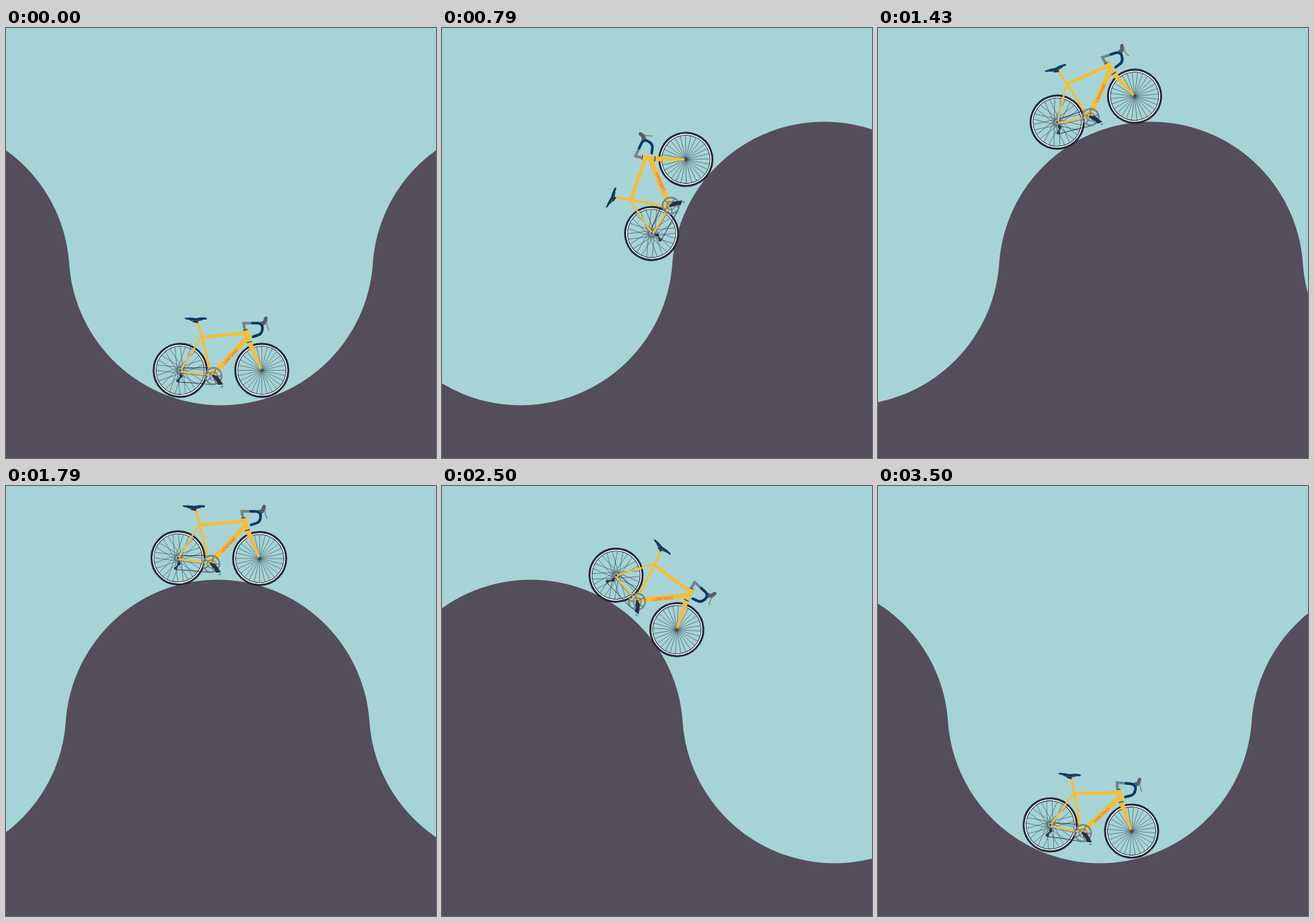
An HTML page that plays this animation: 640x640 px, repeating every 3.57 s.

```html
<!DOCTYPE html>
<html lang="en">
<head>
<meta charset="utf-8">
<title>Bike over the hills</title>
<style>
html, body { margin: 0; height: 100%; overflow: hidden; background: #a6d4d6; }
svg { display: block; width: 100vw; height: 100vh; }
#bike path, #bike circle { fill: none; }
#bike .fill { stroke: none; }
.frame { stroke: #f5bd38; }
.navy { stroke: #083a66; stroke-linejoin: round; stroke-linecap: round; }
.grey { stroke: #738488; }
.dark { stroke: #2c2f49; }
.tyre { stroke: #252736; }
.spokes { stroke: #3b4a55; stroke-width: .6; }
</style>
</head>
<body>
<svg viewBox="0 0 640 640">
  <path id="ground" fill="#544e5c"/>
  <g id="bike"><g transform="translate(-320.25 -509.5)">
    <g id="rear" transform="translate(259.5 509.5)"></g>
    <g id="front" transform="translate(381 509.5)"></g>

    <!-- chain and derailleur -->
    <path class="dark" stroke-width=".9" d="M261 506L309 505.5M256 527L284 528.5L308 531"/>
    <path class="dark" stroke-width="2" d="M260 513L261 518L256 525"/>
    <circle class="dark" cx="261" cy="518" r="1.6" stroke-width="1.8"/>
    <circle class="dark" cx="256" cy="525" r="1.5" stroke-width="1.8"/>
    <circle class="grey" cx="259.5" cy="509.5" r="3.6" stroke-width="2.2"/>

    <!-- frame -->
    <path class="frame" stroke-width="2.6" d="M290.5 460L260 510M260 511L306 517"/>
    <path class="frame" stroke-width="3.6" d="M285 437L292 461L306 516"/>
    <path class="frame" stroke-width="5" d="M290 460.5L359 454"/>
    <path class="frame" stroke-width="7.4" d="M361 459L308 516"/>
    <path class="frame" stroke-width="7" d="M357.3 449L362 466"/>
    <path class="fill" style="fill:#f5bd38" d="M359 469L366 466.5L382.5 509.5L379.5 510.5Z"/>
    <path class="dark" stroke-width="1.3" d="M358.5 468.5L366 466.3M353.5 450L359.5 448.5"/>
    <circle class="dark" cx="381" cy="509.5" r="1.5" stroke-width="1.5"/>
    <circle class="dark" cx="259.5" cy="509.5" r="1" stroke-width="1.2"/>
    <text transform="translate(334.6 488.7) rotate(-47)" text-anchor="middle" dominant-baseline="central"
      font-family="Inter, sans-serif" font-size="6" font-weight="600" fill="#ee6a34">LONTANO</text>

    <!-- saddle -->
    <path class="dark" stroke-width="1.2" d="M273 434L281 437.5L293 434"/>
    <path class="dark" stroke-width="3" d="M279 436.5L286 438"/>
    <path class="fill" style="fill:#083a66" d="M265.5 431.5Q275 430.5 283 432Q291 430 298 431Q301 433 297.5 434Q289 433.5 284 436Q275 434.5 267.5 433.5Z"/>

    <!-- stem, bars and brake -->
    <path class="grey" stroke-width="4" d="M355.5 449L353.8 439.3H366"/>
    <path class="navy" stroke-width="4" d="M367 439.3H375Q382 440 382 446Q382 456 374 457.5L368 459.5"/>
    <path class="fill" style="fill:#555c6b" d="M378 438L383 436L384.5 431Q387 428 389.5 430.5L389 438L384 443Z"/>
    <path class="grey" stroke-width="1.5" d="M388 436Q388 444 392 450"/>

    <!-- crankset -->
    <circle class="grey" cx="309" cy="518" r="12.2" stroke-width="2.4"/>
    <circle class="grey" cx="309" cy="518" r="6" stroke-width="1.6"/>
    <path id="arms" class="grey" stroke-width="2" transform="translate(309 518)"/>
    <path class="dark" stroke-width="3.6" stroke-linecap="round" d="M308.5 517.5L318 528"/>
    <path class="fill" style="fill:#2c2f49" d="M309 516L316 519L323.5 530.5L316 531Z"/>
    <path stroke="#16806f" stroke-width="1.4" d="M320 533.8L323.5 533.5"/>
  </g></g>
</svg>
<script>
const $ = id => document.getElementById(id);
const { sin, cos, sqrt, hypot, floor, PI } = Math;

// Landscape: alternating arcs that meet at mid height
const PERIOD = 904, HALF = PERIOD / 2, RISE = 15.5, MID = 350.5;
const VALLEY_Y = MID - RISE, HILL_Y = MID + RISE;
const R = hypot(HALF / 2, RISE);
const arc = i => `a${R} ${R} 0 0 ${1 - i % 2} ${HALF} 0`;
$('ground').setAttribute('d', `M-358 ${MID}` + [0, 1, 2, 3, 4].map(arc).join('') + 'V640H-358Z');

// Wheels
const polar = (r, a) => `${(r * cos(a)).toFixed(2)} ${(r * sin(a)).toFixed(2)}`;
function rays(n, r0, r1, twist = 0) {
  let d = '';
  for (let i = 0; i < n; i++) {
    const a = i * 2 * PI / n;
    d += `M${polar(r0, a + (i % 2 ? twist : -twist))}L${polar(r1, a)}`;
  }
  return d;
}
const wheel = spokes => `
  <path class="spokes" d="${spokes}"/>
  <circle class="tyre" r="36" stroke-width="1.1"/>
  <circle r="37.3" stroke="#fff" stroke-width="1.6"/>
  <circle class="tyre" r="39.5" stroke-width="2.9"/>`;
$('rear').innerHTML = wheel(rays(28, 4.5, 36, 1.35));
$('front').innerHTML = wheel(rays(28, 1.5, 36));
$('arms').setAttribute('d', rays(5, 3, 12));

// Bike track: valley arc, straight climb, hill arc, then mirrored
const RV = 174.5, RH = 258.5;
const gap = hypot(HALF, 2 * RISE);
const STEEP = PI / 2 - Math.acos((RV + RH) / gap) - Math.atan(2 * RISE / HALF);
const CLIMB = sqrt(gap ** 2 - (RV + RH) ** 2);
const TOP = RV * STEEP + CLIMB + RH * STEEP;

function track(s) {
  if (s > TOP) {
    const p = track(2 * TOP - s);
    return { x: PERIOD - p.x, y: p.y, a: -p.a };
  }
  const fromTop = (TOP - s) / RH;
  if (fromTop < STEEP) {
    return { x: HALF - RH * sin(fromTop), y: HILL_Y - RH * cos(fromTop), a: fromTop };
  }
  const a = Math.min(s / RV, STEEP), u = s - RV * a;
  return { x: RV * sin(a) + u * cos(a), y: VALLEY_Y + RV * cos(a) - u * sin(a), a };
}

// Distance along the track at a few steps, joined by a smooth cubic
const STEPS = 89;
const keys = [[0, 0], [14, 221.5], [20, 368], [26, 466.5], [36, 571], [52, 724],
  [63, 843], [69, 941], [75, 1088], [88, 1295.7]];
const key = i => {
  const n = keys.length, lap = floor(i / n), [m, s] = keys[i - lap * n];
  return [m + lap * STEPS, s + lap * 2 * TOP];
};
function slope(i) {
  const [a, b, c] = [key(i - 1), key(i), key(i + 1)];
  const h = b[0] - a[0], k = c[0] - b[0];
  return (k * (b[1] - a[1]) / h + h * (c[1] - b[1]) / k) / (h + k);
}
function distance(m) {
  let i = 0;
  while (key(i + 1)[0] <= m) i++;
  const [m0, s0] = key(i), [m1, s1] = key(i + 1);
  const h = m1 - m0, u = (m - m0) / h, v = 1 - u;
  return s0 * v * v * (1 + 2 * u) + s1 * u * u * (3 - 2 * u)
    + h * u * v * (slope(i) * v - slope(i + 1) * u);
}

function draw(t) {
  // 25 steps a second, shown 14 times a second
  const shown = floor((floor(t / 10) + .5) * .14);
  const m = floor(shown * 25 / 14 + .5);
  const shift = PERIOD * m / STEPS;
  const p = track(distance(m));
  const tilt = p.a * 180 / PI + 3 * (p.a / STEEP) ** 7;
  $('ground').setAttribute('transform', `translate(${-shift} 0)`);
  $('bike').setAttribute('transform', `translate(${320 + p.x - shift} ${p.y}) rotate(${-tilt})`);
}

let start;
function tick(now) {
  start ??= now;
  draw((now - start) % 3570);
  requestAnimationFrame(tick);
}
draw(0);
requestAnimationFrame(tick);
</script>
</body>
</html>
```
